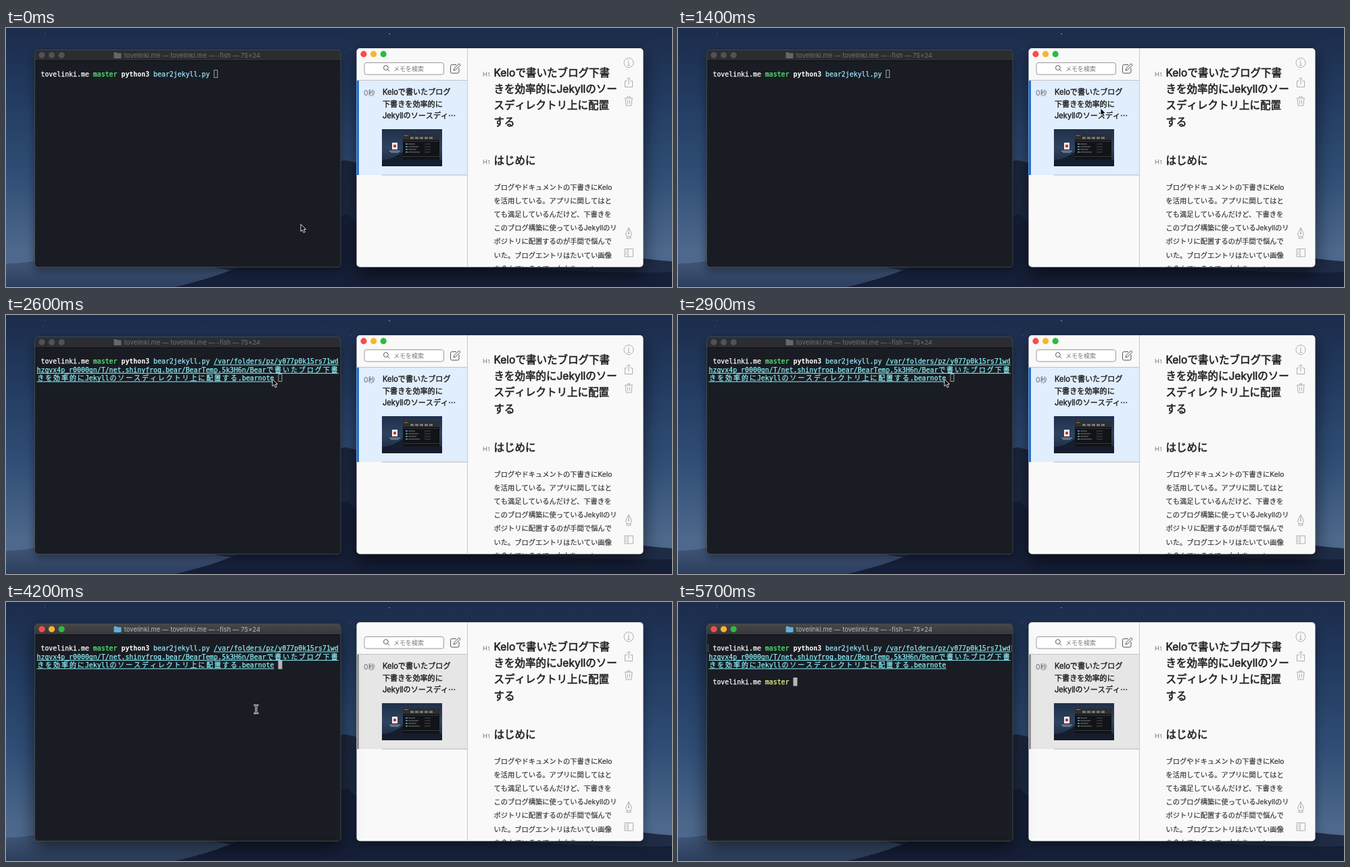
An HTML page with a canvas for the animation above (5800 ms loop, 985x384 px).

```html
<!DOCTYPE html>
<html lang="ja">
<head>
<meta charset="utf-8">
<title>Drag a note into the terminal</title>
<style>
html, body { margin: 0; width: 985px; height: 384px; overflow: hidden; background: #1c2b47; }
canvas { display: block; }
</style>
</head>
<body>
<canvas id="stage" width="985" height="384"></canvas>
<script>
const c = document.getElementById('stage').getContext('2d');
const LOOP = 5800, STEP = 100;
const HOVER = 1700, DROP = 2600, FOCUS = 3300, ENTER = 4500;
const CELL = 5.95, ROW = 12.5;
const MONO = '"DejaVu Sans Mono", "Noto Sans CJK JP", "Noto Sans CJK", monospace';
const SANS = 'Inter, "Noto Sans CJK JP", "Noto Sans CJK", sans-serif';
const HOST = 'tovelinki.me', APP = 'Kelo';

// time, x, y of the pointer tip
const PATH = [
  [0, 436, 291], [300, 436, 291], [1100, 622, 122], [1400, 625, 119],
  [1800, 440, 101], [2000, 412, 97], [2500, 394, 95], [3000, 394, 95],
  [3700, 370, 159], [LOOP, 370, 159]
];

function pointer(t) {
  const i = PATH.findIndex(p => p[0] > t);
  const [t0, x0, y0] = PATH[i - 1], [t1, x1, y1] = PATH[i];
  const u = (t - t0) / (t1 - t0), e = u * u * (3 - 2 * u);
  return [x0 + (x1 - x0) * e, y0 + (y1 - y0) * e];
}

function gradient(y0, y1, ...colors) {
  const g = c.createLinearGradient(0, y0, 0, y1);
  colors.forEach((col, i) => g.addColorStop(i / (colors.length - 1), col));
  return g;
}

function rect(x, y, w, h, fill, r = 0) {
  c.fillStyle = fill;
  c.beginPath();
  c.roundRect(x, y, w, h, r);
  c.fill();
}

function disc(x, y, r, fill) {
  c.fillStyle = fill;
  c.beginPath();
  c.arc(x, y, r, 0, 7);
  c.fill();
}

function shape(d, fill, stroke, width = 1) {
  const p = new Path2D(d);
  if (fill) { c.fillStyle = fill; c.fill(p); }
  if (stroke) { c.strokeStyle = stroke; c.lineWidth = width; c.stroke(p); }
}

// Fills a line of text; a thin outline gives it a heavier weight.
function ink(s, x, y, color, outline) {
  c.fillStyle = c.strokeStyle = color;
  c.fillText(s, x, y);
  if (!outline) return;
  c.lineWidth = outline;
  c.lineJoin = 'round';
  c.strokeText(s, x, y);
}

// y is the visual middle of the line
function text(s, x, y, size, color, outline = 0, align = 'left') {
  c.font = `${size}px ${SANS}`;
  c.textAlign = align;
  ink(s, x, y + size * 0.37, color, outline);
}

function at(x, y, draw) {
  c.save();
  c.translate(x, y);
  draw();
  c.restore();
}

function shadowed(active, draw) {
  c.save();
  c.shadowColor = `rgba(0,0,0,${active ? 0.6 : 0.42})`;
  c.shadowBlur = active ? 28 : 14;
  c.shadowOffsetY = active ? 10 : 5;
  draw();
  c.restore();
}

function lights(x, y, colors) {
  colors.forEach((col, i) => disc(x + i * 14.6, y, 4.6, col));
}

const BRIGHT = ['#fc4b48', '#f8b52b', '#2dbb3c'];

function wallpaper() {
  rect(0, 0, 985, 384, gradient(0, 330, '#1c2c4b', '#233c62', '#304e76', '#4d688c'));
  disc(567, 8.5, 0.8, '#a8b8d0');
  disc(58, 8, 0.6, '#7288aa');
  disc(510, 30, 0.6, '#6f84a5');
  shape('M0 350C150 345 360 250 500 196C570 205 760 330 985 346V384H0Z',
    gradient(196, 384, '#1b263d', '#202d48'));
  shape('M0 350C120 340 300 336 420 384H0Z', gradient(340, 384, '#43597b', '#2c3e5d'));
  shape('M250 384C400 350 440 290 506 276C540 320 700 368 985 362V384Z', '#151f37');
}

// Writes on the character grid; wide characters take two cells.
function put(s, col, row, color, bold, underline) {
  c.font = `${bold ? 700 : 400} 9.88px ${MONO}`;
  c.textAlign = 'left';
  const x0 = 45.5 + col * CELL, y = 72 + row * ROW;
  for (const ch of s) {
    const wide = ch > '\u2e80';
    ink(ch, 45.5 + col * CELL + (wide ? 0.8 : 0), y, color, bold ? 0 : 0.25);
    col += wide ? 2 : 1;
  }
  if (underline) c.fillRect(x0, y + 1.4, 45.5 + col * CELL - x0, 1);
  return col;
}

function prompt(row, color) {
  put(HOST, 1, row, '#ffffff');
  put('master', 14, row, color);
}

function caret(col, row, solid) {
  const x = 45.5 + col * CELL, y = 62 + row * ROW;
  if (solid) return rect(x, y, 6, 12.5, '#b6b6b6');
  c.strokeStyle = '#a2a4a6';
  c.lineWidth = 1;
  c.strokeRect(x + 0.5, y + 0.5, 5, 11);
}

function terminal(t) {
  const active = t >= FOCUS, dropped = t >= DROP, done = t >= ENTER;
  shadowed(active, () => rect(42.5, 32, 452.5, 322, '#191d23', 5));
  rect(42.5, 32, 452.5, 16.5, active ? gradient(32, 48, '#46474a', '#37383b') : '#2b2d31', [5, 5, 0, 0]);
  rect(42.5, 48, 452.5, 1, '#0d0f12');
  c.strokeStyle = '#4c4f54';
  c.lineWidth = 0.8;
  c.beginPath();
  c.roundRect(42.5, 32.5, 452.5, 322, 5);
  c.stroke();
  if (t >= HOVER && !dropped) {
    c.strokeStyle = '#62666d';
    c.lineWidth = 1;
    c.strokeRect(43.5, 49.5, 451, 304);
  }
  lights(53, 40.3, active ? BRIGHT : Array(3).fill('#515256'));
  shape('M159.5 37q0-1 1-1h3l1.2 1.3h4.8q1 0 1 1v5.7q0 1-1 1h-9q-1 0-1-1Z', active ? '#62aedb' : '#656769');
  text(`${HOST} — ${HOST} — -fish — 75×24`, 275.5, 40.5, 9.5, active ? '#b9babb' : '#707174', 0, 'center');

  prompt(0, '#5af078');
  put('python3', 21, 0, '#ffffff', true);
  put('bear2jekyll.py', 29, 0, '#9be4f8');
  if (!dropped) return caret(44, 0);
  const cyan = '#8cf0fa';
  put('/var/folders/pz/y077p0k15rs71wd', 44, 0, cyan, false, true);
  put('hzgvx4p_r0000gn/T/net.shinyfrog.bear/BearTemp.5k3H6n/Bearで書いたブログ下書', 0, 1, cyan, false, true);
  const end = put('きを効率的にJekyllのソースディレクトリ上に配置する.bearnote', 0, 2, cyan, false, true);
  if (!done) return caret(end + 1, 2, active);
  shape('M46 64H44.5V73H46M492 64H493.5V73H492', null, '#65686c', 0.8);
  prompt(4, '#f2f58c');
  caret(21, 4, true);
}

function thumbnail() {
  rect(0, 0, 89, 55, gradient(0, 55, '#1f304b', '#2f435e', '#1b2538'));
  shape('M0 46C25 44 32 28 48 26S75 42 89 46V55H0Z', '#151d2e');
  rect(31, 7, 54, 38, '#111316', 1.5);
  rect(31, 7, 54, 9, '#2c2e32', [1.5, 1.5, 0, 0]);
  BRIGHT.forEach((col, i) => disc(33.5 + i * 2.4, 9.5, 0.8, col));
  for (let i = 0; i < 5; i++) rect(42 + i * 7, 11.5, 5, 3, '#7b7d81', 0.6);
  rect(32, 17, 52, 2, '#24272b');
  for (let i = 0; i < 4; i++) {
    rect(35, 21 + i * 4, 3, 2, '#557f9c');
    rect(39, 21.5 + i * 4, 10 + i * 5 % 8, 1, '#777a7e');
    rect(63, 21.5 + i * 4, 9, 1, '#4a4d52');
  }
  rect(31, 40, 54, 1, '#34373c');
  rect(15, 20, 8, 10, '#f3f3f3', 0.5);
  disc(19, 25, 2.3, '#cf3033');
  rect(11, 32, 16, 1, '#a4acb8');
  rect(13, 34, 12, 1, '#8d96a4');
}

function icons() {
  const g = '#adadad';
  shape('M914 51.5a7 7 0 1 0 14 0a7 7 0 1 0-14 0M921 50.5V55.5M919.5 50.5H921M919.3 55.5H922.7', null, g);
  disc(921, 48, 0.8, g);
  shape('M918.5 78.5H915.5V87.5H926.5V78.5H923.5M921 83.5V73.5M918 76.5L921 73.5L924 76.5', null, g);
  shape('M915 104H927M919 104V102H923V104M916 104L917 115H925L926 104M919.5 106.5V112.5M922.5 106.5V112.5', null, g);
  shape('M921 296L916.5 305L918.5 309.5H923.5L925.5 305ZM921 297V304M918 312H924V309.5H918Z', null, g);
  disc(921, 304.5, 1.2, g);
  shape('M915 327.5H927.5V339H915ZM920 327.5V339M916.5 330.5H918.5M916.5 333H918.5M916.5 335.5H918.5', null, g);
}

function notes(t) {
  const active = t < FOCUS, dark = '#222';
  shadowed(active, () => rect(518.5, 30, 424, 324.5, '#f9f9f9', 5));
  c.save();
  c.beginPath();
  c.roundRect(518.5, 30, 424, 324.5, 5);
  c.clip();
  if (active) lights(529, 38.7, BRIGHT);
  rect(682, 30, 1, 325, '#c9c9c9');
  rect(518, 77, 164, 1, '#c4c4c4');
  rect(518, 78, 164, 140, active ? '#e1eefe' : '#e6e6e6');
  rect(518, 78, 4, 140, active ? '#236fca' : '#929292');
  rect(556, 217.5, 126, 1, '#b8b8b8');

  c.strokeStyle = '#999';
  c.lineWidth = 1;
  c.beginPath();
  c.roundRect(530, 51.5, 117.5, 17.5, 3);
  c.fillStyle = '#fff';
  c.fill();
  c.stroke();
  shape('M558.5 59a3.4 3.4 0 1 0 6.8 0a3.4 3.4 0 1 0-6.8 0M564.3 61.5L567 64.3', null, '#555');
  text('メモを検索', 573, 60.5, 9, '#777');
  shape('M666 54.5H659.5Q657.5 54.5 657.5 56.5V65Q657.5 67 659.5 67H668Q670 67 670 65V59M662 63L662.8 60L670 52.8L672 54.8L664.8 62Z', null, '#555');

  text('0秒', 529, 96, 10.4, '#666');
  [`${APP}で書いたブログ`, '下書きを効率的に', 'Jekyllのソースディ⋯']
    .forEach((s, i) => text(s, 557, 95 + i * 17.5, 11.1, dark, 0.4));
  at(556, 150, thumbnail);

  for (const y of [68, 198]) {
    text('H', 705, y, 9.5, '#777');
    text('1', 712.5, y + 1.2, 7.5, '#777');
  }
  [`${APP}で書いたブログ下書`, 'きを効率的にJekyllのソー', 'スディレクトリ上に配置', 'する']
    .forEach((s, i) => text(s, 721.5, 66.5 + i * 24.1, 15.5, dark, 0.6));
  text('はじめに', 721.5, 196.5, 15.5, dark, 0.6);
  [`ブログやドキュメントの下書きに${APP}`, 'を活用している。アプリに関してはと',
    'ても満足しているんだけど、下書きを', 'このブログ構築に使っているJekyllのリ',
    'ポジトリに配置するのが手間で悩んで', 'いた。ブログエントリはたいてい画像',
    'を含んでいるので、本文を mark']
    .forEach((s, i) => text(s, 721.5, 236.5 + i * 20.05, 10.25, '#333', 0.2));
  icons();
  c.restore();
}

function draggedNote() {
  c.save();
  c.shadowColor = 'rgba(0,0,0,.5)';
  c.shadowBlur = 4;
  c.shadowOffsetY = 2;
  shape('M0-3H24L33 6V41H0Z', '#eeeeee');
  c.restore();
  shape('M24-3L33 6Q27 4 24 6Q25 1 24-3Z', '#cccccc');
  disc(17, 20, 11, '#cb3135');
}

function plusBadge() {
  disc(7, 17, 7.4, '#e2f2df');
  disc(7, 17, 6.7, '#27a62d');
  shape('M7 13V21M3 17H11', null, '#fff', 2);
}

function cursor(t) {
  if (t >= ENTER) return;
  const [x, y] = pointer(t);
  at(x, y, () => {
    if (t > FOCUS) {
      const beam = 'M-3.5-6Q0-6 0-3.5Q0-6 3.5-6M0-4V4M-3.5 6Q0 6 0 3.5Q0 6 3.5 6M-2 0H2';
      shape(beam, null, '#f2f2f2', 2.6);
      return shape(beam, null, '#222', 0.9);
    }
    if (t > 1400 && t < DROP) {
      draggedNote();
      if (t >= HOVER) plusBadge();
    }
    shape('M0 0V10.5L2.4 8.3L4.2 12.4L6.2 11.5L4.4 7.5H7.6Z', '#050505', '#f4f4f4', 0.9);
  });
}

function frame(now) {
  const t = Math.floor(now % LOOP / STEP) * STEP;
  wallpaper();
  if (t < FOCUS) { terminal(t); notes(t); }
  else { notes(t); terminal(t); }
  cursor(t);
  requestAnimationFrame(frame);
}
requestAnimationFrame(frame);
</script>
</body>
</html>
```
